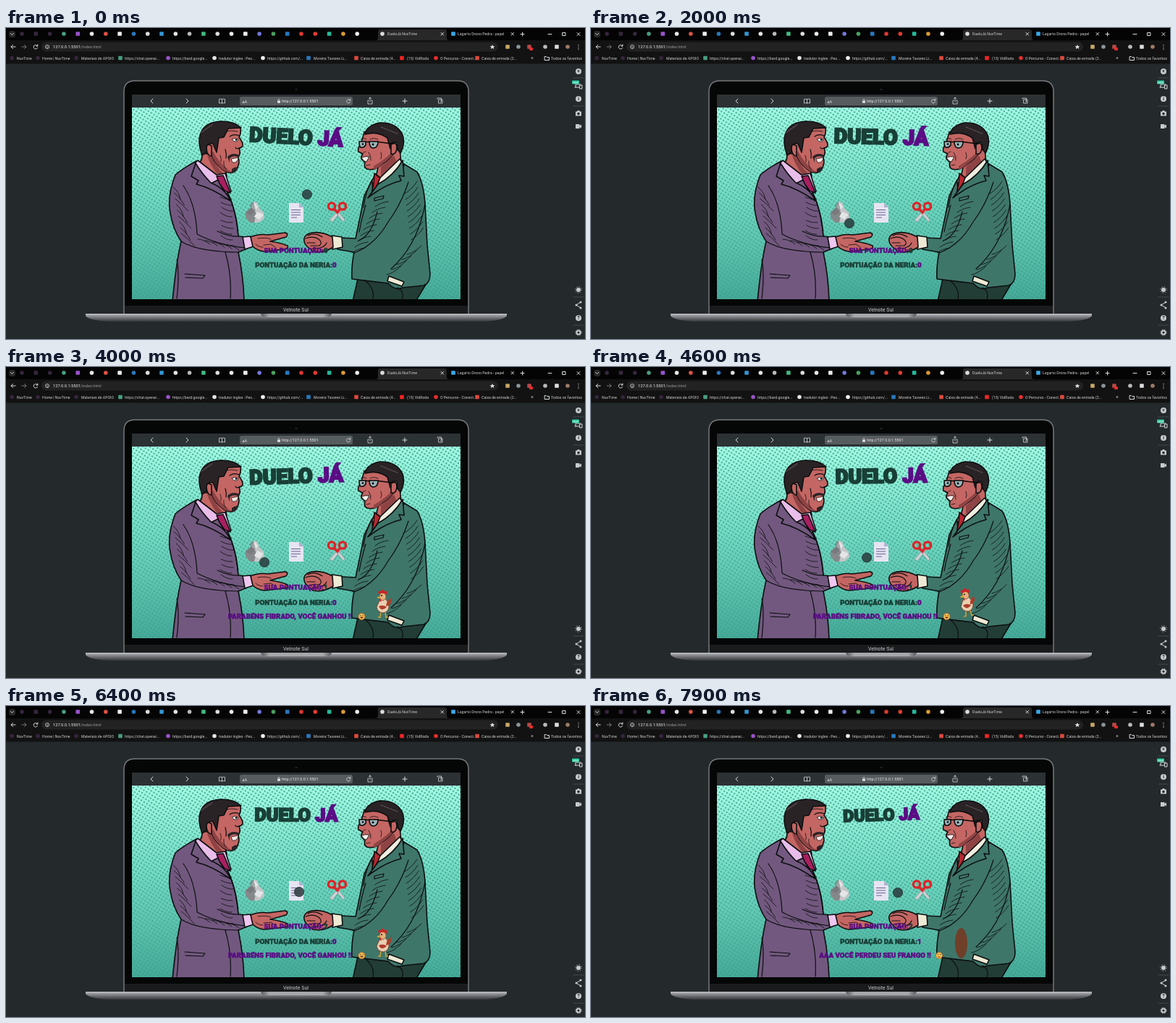
These frames come from a looping animation (800 by 430 pixels, 8 s). An HTML page:

```html
<!DOCTYPE html>
<html lang="pt">
<head>
<meta charset="utf-8">
<title>Duelo</title>
<style>
html, body { margin: 0; width: 100%; height: 100%; overflow: hidden; background: #24292c; }
svg { display: block; width: 800px; height: 430px; }
text { font-family: Roboto, "Open Sans", sans-serif; }
.small { font-size: 5.2px; fill: #cfcfcf; }
.game { font-family: Roboto, Inter, sans-serif; font-weight: 900; text-anchor: middle; }
.score { font-size: 9.7px; stroke-width: .5; }
.pu { fill: #5b0d85; stroke: #5b0d85; }
.gr { fill: #193f37; stroke: #193f37; }
.ink { stroke: #0c0f10; stroke-width: 1.6; stroke-linejoin: round; stroke-linecap: round; }
.line { fill: none; stroke: #0c0f10; stroke-width: 1.2; stroke-linecap: round; stroke-linejoin: round; }
.thin { stroke-width: .8; }
.icon { fill: none; stroke: #d8dcde; stroke-width: 1; stroke-linecap: round; stroke-linejoin: round; }
.skin { fill: #c46663; }
.shade { fill: #8f4344; }
.hair { fill: #2a2326; }
</style>
</head>
<body>
<svg viewBox="0 0 800 430">
<defs>
  <linearGradient id="mint" x2="0" y2="1">
    <stop stop-color="#a4fde6"/><stop offset=".45" stop-color="#73dcc5"/><stop offset="1" stop-color="#45aa98"/>
  </linearGradient>
  <linearGradient id="fade" x1=".6" x2=".4" y2="1">
    <stop stop-color="#bbb"/><stop offset=".45" stop-color="#999"/><stop offset="1" stop-color="#444"/>
  </linearGradient>
  <linearGradient id="metal" x2="0" y2="1">
    <stop stop-color="#c3c4c8"/><stop offset=".3" stop-color="#8e8f94"/><stop offset="1" stop-color="#333438"/>
  </linearGradient>
  <linearGradient id="notch" x2="1" y2="0">
    <stop stop-color="#55565a"/><stop offset=".12" stop-color="#a6a7ab"/><stop offset=".88" stop-color="#a6a7ab"/><stop offset="1" stop-color="#55565a"/>
  </linearGradient>
  <pattern id="dots" width="4.6" height="4.6" patternUnits="userSpaceOnUse" patternTransform="rotate(32)">
    <circle cx="2.3" cy="2.3" r="1.25" fill="#25806f"/>
  </pattern>
  <mask id="dotFade"><rect x="174" y="110" width="454" height="265" fill="url(#fade)"/></mask>
  <clipPath id="screen"><rect x="174" y="110" width="454" height="265"/></clipPath>
</defs>

<rect width="800" height="430" fill="#24292c"/>
<g id="chrome"></g>
<g id="side"></g>

<!-- laptop -->
<path d="M163 396V88q0-15 15-15H624q15 0 15 15V396Z" fill="#050606" stroke="#77797c" stroke-width="1.5"/>
<rect x="164" y="384" width="474" height="11" fill="#1a1b1d"/>
<circle cx="401" cy="85" r="1.6" fill="#1a2027"/>
<path d="M110 395H692V398Q688 404 660 406H142Q114 404 110 398Z" fill="url(#metal)"/>
<path d="M352 395H450Q449 400 443 400H359Q353 400 352 395Z" fill="url(#notch)"/>
<text x="400.500" y="391.500" font-size="7" fill="#c9cbcc" text-anchor="middle">Velnote Sul</text>

<!-- inner browser bar -->
<rect x="174" y="92" width="454" height="18.500" fill="#2c3134"/>
<rect x="323" y="95" width="156" height="12" rx="2.500" fill="#575c5f"/>
<g class="icon">
  <path d="M203 98l-3 3 3 3M249 98l3 3-3 3M548 101h6M551 98v6"/>
  <path d="M298.500 98.500q-2-1-4 0v5.500q2-1 4 0q2-1 4 0v-5.500q-2-1-4 0v5.500" stroke-width=".8"/>
  <path d="M501 100h-1v5h6v-5h-1M503 102v-6M501.500 97.500l1.500-1.500 1.500 1.500" stroke-width=".8"/>
  <path d="M596 98v-1h5.500v5h-1M598 99h5v5h-5z" stroke-width=".8"/>
  <path d="M475.500 100a2.600 2.600 0 1 0 .2 2M475.800 98v2h-2" stroke-width=".8"/>
</g>
<text x="326.500" y="103.500" font-size="5.500" fill="#eee">ᴀA</text>
<rect x="375" y="100.500" width="4" height="3.200" fill="#ddd"/><path d="M375.900 100.500v-1a1.100 1.100 0 0 1 2.200 0v1" fill="none" stroke="#ddd" stroke-width=".7"/>
<text x="381" y="103.200" font-size="5.400" fill="#eee">http://127.0.0.1:5501</text>

<g clip-path="url(#screen)">
  <rect x="174" y="110" width="454" height="265" fill="url(#mint)"/>
  <rect x="174" y="110" width="454" height="265" fill="url(#dots)" mask="url(#dotFade)"/>

  <!-- left man -->
  <g>
    <path class="ink" fill="#72587f" d="M263 184Q244 194 234 203Q224 228 226 249Q229 276 242 295Q235 325 230 378H329Q328 343 321 310L333 305L331 289L321 288Q319 254 306 227Q304 210 296 200Z"/>
    <path class="ink skin" d="M270 172Q273 184 265 187L296 209L305 205L300 180Z"/>
    <path class="shade" d="M278 176Q282 190 294 205L301 202Q288 190 286 178Z"/>
    <path class="ink skin" d="M272 162Q282 136 306 137L324 138Q325 146 322 151Q328 159 327 163Q325 166 322 166Q325 173 321 178L322 186Q320 197 313 200Q304 201 296 193Q286 184 284 174Z"/>
    <path class="shade" d="M286 170Q292 184 308 197L313 199Q304 201 296 193Q286 184 284 174Z"/>
    <path class="ink hair" d="M271 176Q264 158 269 145Q275 130 297 129Q316 129 325 138L307 139L301 151L294 152L291 172L286 160Q278 157 277 172Z"/>
    <path class="ink skin" d="M284 163Q277 158 277 167Q278 177 284 177Z"/>
    <path d="M306 178Q313 171 323 176L322 179Q314 175 309 180L309 186Z" fill="#2a2326"/>
    <path d="M312 195Q317 191 321 193Q318 201 312 200Z" fill="#2a2326"/>
    <path d="M311 181L321 179Q320 187 313 186Z" fill="#f6e6e5" stroke="#0c0f10" stroke-width=".7"/>
    <path d="M312 154Q316 151 321 154L319 157Q315 158 312 154Z" fill="#fff" stroke="#0c0f10" stroke-width=".8"/>
    <circle cx="318" cy="154.500" r="1.300"/>
    <path class="line" d="M309 150Q315 146 322 149M303 168Q305 174 304 180M322 166Q318 168 317 165"/>
    <path class="line thin" d="M304 143Q312 141 320 143M301 184Q300 191 304 195M296 176Q298 181 297 185"/>
    <path class="ink" fill="#e9bde9" d="M265 183L291 203L303 201L311 226L303 229L293 210L283 215Q268 201 261 187Z"/>
    <path class="ink" fill="#a91f60" d="M291 205L300 204L304 213L310 228L302 225L295 215Z"/>
    <path class="ink" fill="#72587f" d="M262 187L256 205L266 211L263 216Q284 221 310 239Q303 222 283 214Q271 202 262 187Z"/>
    <path class="line" d="M306 227Q317 249 321 288M245 218Q262 242 264 285Q292 300 331 304M242 295Q264 309 321 310M321 288Q309 289 292 281"/>
    <g id="folds" class="line thin"></g>
    <path class="line" d="M236 320Q240 340 236 374M303 310Q312 340 310 374M247 340L275 342L272 346L248 345"/>
    <path class="ink" fill="#eec6ef" d="M327 289L338 288L342 302L330 306Z"/>
    <path class="ink skin" d="M338 289Q349 284 362 286L386 283Q391 285 387 289L365 295Q380 297 389 301Q391 305 385 306L357 309Q347 308 341 302Z"/>
    <path class="line thin" d="M348 291Q359 289 366 292M356 300L366 299L372 303M345 299Q349 303 355 303"/>
  </g>

  <!-- right man -->
  <g>
    <path class="ink" fill="#223d36" d="M488 338L479 378H566L584 348Z"/>
    <path class="ink" fill="#3f766a" d="M545 185L568 199Q577 214 579 243L582 300L586 340Q586 353 577 356L548 359Q538 364 528 353L478 347Q477 330 481 310L458 306L462 290L483 291Q489 263 495 232L506 210Z"/>
    <path class="ink skin" d="M517 180L511 206L520 212L546 188L544 166Z"/>
    <path class="shade" d="M518 192L536 176L540 186L518 206Z"/>
    <path class="ink skin" d="M495 144Q516 134 536 150L538 170Q531 181 520 188Q510 198 499 195Q494 193 496 186L491 181Q490 178 493 174L487 171Q485 168 491 158Z"/>
    <path class="shade" d="M536 168Q528 179 508 191L508 196Q516 193 520 188Q531 181 538 170Z"/>
    <path class="ink hair" d="M496 147Q498 135 516 131Q540 130 548 148Q552 160 545 173L541 168L540 158L534 158L531 167L527 152Q513 142 496 147Z"/>
    <path class="ink skin" d="M532 161Q540 156 540 166Q539 176 532 174Z"/>
    <path d="M488 157H497V162Q494 166 490 165Q488 163 488 157ZM502 157H514Q514 166 507 166Q502 165 502 157Z" fill="#9cb4b8" stroke="#080808" stroke-width="1.500"/>
    <path d="M497 157.500H502M514 157.500L534 160" stroke="#080808" stroke-width="1.500"/>
    <circle cx="493" cy="160.500" r="1.300"/><circle cx="507" cy="161" r="1.400"/>
    <path d="M491 179Q497 177 502 178L498 185Q494 185 491 179Z" fill="#f8eeea" stroke="#0c0f10" stroke-width=".9"/>
    <path class="line thin" d="M501 172Q505 177 504 183M498 190L503 189M490 154Q494 151 498 154M503 154Q508 151 514 154M494 172L497 171M518 172Q520 177 518 181"/>
    <path class="ink" fill="#f0eee0" d="M544 181L550 190L518 218L507 229L506 211L510 202L517 207Z"/>
    <path class="ink" fill="#b92730" d="M509 201L517 207L514 215L505 230L508 214Z"/>
    <path class="ink" fill="#3f766a" d="M548 183L550 205L543 204L546 211Q522 217 500 235L514 216Q536 204 548 183Z"/>
    <path class="line" d="M505 211Q497 226 494 248M556 213Q546 244 528 268Q510 300 481 311M579 243Q569 300 532 333M509 235L522 232L521 236L509 239ZM497 245Q491 265 488 282M513 254Q505 287 487 294"/>
    <g id="creases" class="line thin"></g>
    <path class="ink" fill="#eee9d4" d="M529 343L550 351L547 357L527 350Z"/>
    <path class="line" d="M541 359Q551 365 547 375M496 349Q510 360 507 375"/>
    <path class="ink" fill="#eee9d4" d="M450 287L464 289L465 303L451 306Z"/>
    <path class="ink skin" d="M451 289Q437 281 423 283Q413 285 412 291Q411 297 416 302L424 309Q438 312 452 303Z"/>
    <path class="line" d="M414 291Q425 287 432 292Q438 297 433 301L421 301M417 287Q426 282 437 289M416 297L427 297M423 305L434 304Q441 302 443 297"/>
  </g>

  <!-- choices -->
  <g transform="translate(0 -2)">
    <path fill="#c4c6c8" d="M342 242L347 243L350 251L356 257L357 265L350 271H337L331 264L332 256L338 251Z"/>
    <path fill="#85888a" d="M331 257L339 250L346 258L343 271L337 271L331 264Z"/>
    <path fill="#e4e5e6" d="M343 243L348 249L345 254L339 250ZM347 256L356 260L350 267L343 263Z"/>
    <path fill="#6d7072" d="M342 242L337 246L338 251L331 257L338 261L345 254Z" opacity=".55"/>
    <path fill="#e7e4f2" d="M391 244H405L411 250V271H391Z"/>
    <path fill="#b4adcf" d="M405 244V250H411Z"/>
    <path stroke="#6c6494" stroke-width="1.100" d="M394 253.500H407M394 257H407M394 260.500H407M394 264H402"/>
    <path fill="#cfd2d5" stroke="#868b8f" stroke-width=".6" d="M453 254L456 252L468 267L466 270ZM461 252L464 254L451 270L447 268Z"/>
    <g fill="none" stroke="#db2528" stroke-width="3.400"><circle cx="450" cy="248.500" r="4.600"/><circle cx="465" cy="248.500" r="4.600"/><path d="M453 252L458 257L462 252"/></g>
  </g>

  <!-- scores -->
  <g id="scores" class="game score">
    <text x="400.500" y="310.500" class="pu">SUA PONTUAÇÃO:<tspan id="mine" class="gr">0</tspan></text>
    <text x="400.500" y="331" class="gr">PONTUAÇÃO DA NERIA:<tspan id="theirs" class="pu">0</tspan></text>
  </g>
  <text id="message" class="game score pu" x="392.500" y="348"></text>
  <g id="face">
    <circle r="4.600" fill="#f0bd52" stroke="#a85d27" stroke-width=".7"/>
    <path id="mouth" fill="#7c3520"/>
    <path d="M-2.200 -1.500h1M1.200 -1.500h1" stroke="#40251c" stroke-width="1.200"/>
  </g>
  <g id="rooster">
    <path d="M-3 10L-4 18H-7M3 10L4 18H7" fill="none" stroke="#d5a436" stroke-width="1.500"/>
    <path d="M-3 -8Q-7 -1 -9 4Q-7 12 1 12Q9 10 8 0Q6 -4 3 -8Z" fill="#e8ceb0" stroke="#6d3322" stroke-width=".8"/>
    <path d="M4 3Q14 1 10 -9Q7 -4 5 -2ZM-6 3Q-2 11 5 4Q0 0 -6 3Z" fill="#ae3c2a"/>
    <path d="M-5 -11Q-5 -16 0 -16Q5 -15 4 -8L0 -5L-4 -7Z" fill="#e6b07a" stroke="#6d3322" stroke-width=".7"/>
    <path d="M-6 -14Q-8 -20 -3 -18Q-1 -23 2 -18Q7 -20 5 -13Q0 -17 -6 -14Z" fill="#cc2627"/>
    <path d="M-5 -11L-9 -9L-4 -8Z" fill="#e8b733"/><path d="M-4 -8Q-6 -3 -2 -4Z" fill="#cc2627"/>
    <circle cx="-2" cy="-12" r=".9"/>
  </g>
  <ellipse id="loser" cx="511.500" cy="328" rx="8.500" ry="21" fill="#6f3f29"/>

  <g id="title">
    <text class="game" y="10.500" font-size="28.500" stroke-width="2.200"><tspan class="gr">DUELO</tspan><tspan class="pu"> JÁ</tspan></text>
  </g>
  <circle id="cursor" r="6.600" fill="#28383a" fill-opacity=".84" stroke="#1b292b" stroke-width=".7"/>
</g>
</svg>

<script>
const $ = id => document.getElementById(id);
const dot = (x, y, c, square) => square
  ? `<rect x="${x - 2.8}" y="${y - 2.8}" width="5.600" height="5.600" rx=".7" fill="${c}"/>`
  : `<circle cx="${x}" cy="${y}" r="2.800" fill="${c}"/>`;
const label = (x, y, s, extra = '') => `<text class="small" x="${x}" y="${y}" ${extra}>${s}</text>`;
const stroke = (d, extra = '') => `<path class="icon" d="${d}" ${extra}/>`;

function buildChrome() {
  const tabs = ['#35263c', '#35263c', '#35263c', '#479e83', '#9a52cc', '#e8e8e8', '#dd5145', '#eee', '#2878bd', '#ddd',
    '#3297d5', '#e6e6e6', '#bbb', '#42b883', '#ddd', '#eee', '#eee', '#7678dc', '#4aa05e',
    '#2878bd', '#dc3831', '#e33b31', '#25b99b', '#dd9a35', '#eee'];
  const marks = [
    [8, 'NuvTime', '#35263c', 15], [44, 'Home | NuvTime', '#35263c', 50], [97, 'Materiais de APOIO', '#35263c', 104],
    [158, 'https://chat.openai...', '#479e83', 164, 1], [224, 'https://bard.google...', '#9a52cc', 230],
    [288, 'tradutor ingles - Pes...', '#e5e5e5', 294], [355, 'https://github.com/...', '#eee', 361],
    [418, 'Moreira Tavares Li...', '#2878bd', 425, 1], [484, 'Caixa de entrada (4...', '#dc493d', 490, 1],
    [547, '(15) VidRoda', '#ed2525', 554, 1], [594, 'O Percurso - Conect...', '#e72e2e', 600],
    [651, 'Caixa de entrada (2...', '#dc493d', 657, 1]];
  let s = '<rect width="800" height="18" fill="#040404"/><rect y="17" width="800" height="32.500" fill="#121212"/>' +
    '<path d="M511 17q3 0 3-4V5q0-3 3-3h89q3 0 3 3v8q0 4 3 4z" fill="#282828"/>' +
    '<rect x="49" y="19.500" width="631" height="13" rx="6.500" fill="#222"/>' +
    '<rect x="4" y="4" width="9" height="9" rx="3" fill="#282828"/>' +
    stroke('M6.500 7.500l2 2 2-2');
  tabs.forEach((c, i) => s += dot(22 + i * 19.3, 8, c, i % 3 === 1));
  s += dot(520, 8, '#ddd') + label(527, 10, 'DueloJá NuvTime') + dot(618, 8, '#37a9e8', 1) +
    label(624, 10, 'Lagarto Drono Pedra - papel') +
    stroke('M601 6.500l3.500 3.500m0-3.500l-3.500 3.500M698 6.500l3.500 3.500m0-3.500l-3.500 3.500M711 8.500h5M713.500 6v5M749 8.500h5M769 6.500h4v4h-4zM789 6.500l4 4m0-4l-4 4') +
    stroke('M13 26H7m2.500-2.500L7 26l2.500 2.500', 'stroke-width=".9"') +
    stroke('M22 26h6m-2.500-2.500L28 26l-2.500 2.500', 'style="stroke:#777"') +
    stroke('M43.500 25a2.800 2.800 0 1 0 0 2.500M43.800 23v2h-2') +
    '<circle cx="57" cy="26" r="2.500" fill="none" stroke="#bbb"/><path d="M57 25v3" stroke="#bbb" stroke-width=".8"/>' +
    '<text x="65" y="28" font-size="5.700" fill="#eee">127.0.0.1:5501<tspan fill="#999">/index.html</tspan></text>' +
    '<path d="M672 23l1 2 2.400.2-1.800 1.600.6 2.200-2.200-1.200-2.200 1.200.6-2.200-1.800-1.600 2.400-.2z" fill="#ddd"/>';
  [[693, '#c8a765'], [708, '#8d969a'], [723, '#b74848'], [745, '#bbb'], [761, '#ddd'], [776, '#9d7b68']]
    .forEach(([x, c], i) => s += dot(x, 26, c, i % 2 === 0));
  s += '<rect x="723" y="27" width="5" height="4" rx="1" fill="#e62c2c"/><path d="M791 23v.8M791 25.800v.8M791 28.600v.8" stroke="#ddd" stroke-width="1.500"/>';
  for (const [x, name, color, tx, square] of marks) s += dot(x, 41.5, color, square) + label(tx, 43.5, name);
  s += label(725, 43.5, '»', 'style="font-size:8px"') + stroke('M744.500 39.500h2l1 1h3v4h-6z', 'stroke-width=".8"') + label(753, 43.5, 'Todos os favoritos');
  $('chrome').innerHTML = s;
}

function buildSide() {
  const disc = (y, mark) => `<circle cx="791" cy="${y}" r="4" fill="#c7cacb"/>` +
    `<text x="791" y="${y + 2.3}" font-size="6.500" font-weight="700" text-anchor="middle" fill="#24292c">${mark}</text>`;
  $('side').innerHTML = disc(60, '×') + disc(98, 'i') + disc(401, '?') +
    stroke('M786 82h6M787 82v-4h7M793 79h3v5h-3z') +
    '<rect x="782" y="72.500" width="10" height="5" rx="1" fill="#24c69b"/>' + label(787, 76.5, 'NEW', 'text-anchor="middle" style="font-size:3.500px;fill:#fff"') +
    stroke('M784 69h14M784 108h14M784 372h14M784 411h14', 'style="stroke:#42484c"') +
    '<path d="M787 115.500h2l1-1.500h2l1 1.500h2v6h-8z" fill="#c7cacb"/><circle cx="791" cy="118.500" r="1.700" fill="#24292c"/>' +
    '<path d="M787 133h5.500v2l2.500-1.500v5l-2.500-1.500v2H787z" fill="#c7cacb"/>' +
    '<circle cx="791" cy="362" r="3" fill="#c7cacb"/><circle cx="791" cy="362" r="4.300" fill="none" stroke="#c7cacb" stroke-dasharray="1.200 2.200"/>' +
    stroke('M794 379l-6 4 6 4') +
    [[788, 383], [794, 379], [794, 387]].map(([x, y]) => `<circle cx="${x}" cy="${y}" r="1.500" fill="#c7cacb"/>`).join('') +
    '<circle cx="791" cy="421" r="2.600" fill="none" stroke="#c7cacb" stroke-width="2"/><circle cx="791" cy="421" r="4" fill="none" stroke="#c7cacb" stroke-dasharray="1.600 1.600"/>';
}

function buildFolds() {
  let left = '', right = '';
  for (let i = 0; i < 9; i++) {
    const y = 220 + i * 8;
    left += `<path d="M${231 + i * 1.4} ${y}q8 6 ${10 + i % 3 * 4} 17"/><path d="M${312 + i % 3} ${y + 17}q-7 1-16 ${-3 - i % 4}"/>`;
    right += `<path d="M${568 + i * 1.1} ${y - 8}q-7 11-17 17"/><path d="M${528 - i * 4} ${y + 20}q-10 1-18 7"/>`;
  }
  for (let i = 0; i < 5; i++) {
    left += `<path d="M${265 + i * 10} ${292 + i * 2}q8 0 17 7"/>`;
    right += `<path d="M${574 - i * 7} ${301 + i * 7}q-10 10-20 12"/>`;
  }
  for (let i = 0; i < 6; i++) left += `<path d="M${268 + i * 3} ${146 - i * 2}l2-3" stroke="#77686c"/>`;
  for (let i = 0; i < 6; i++) right += `<path d="M${518 + i * 4} ${137 + i * 1.6}l3 1" stroke="#77686c"/>`;
  $('folds').innerHTML = left;
  $('creases').innerHTML = right;
}

const LOOP = 8000, WIN = 3200, WIN2 = 5800, LOSE = 7000;
const path = [[0, 416, 230], [900, 357, 270], [4300, 357, 270], [4900, 405, 257], [7200, 405, 257], [7700, 424, 258], [LOOP, 424, 258]];
const sizes = [[0, 1], [2500, 1.006], [4000, 1], [5300, .95], [6400, .885], [7900, .815], [LOOP, .811]];

function sample(steps, t) {
  const i = steps.findIndex((k, n) => n && t <= k[0]);
  const a = steps[i - 1], b = steps[i], u = (t - a[0]) / (b[0] - a[0]);
  return a.slice(1).map((v, n) => v + (b[n + 1] - v) * u);
}
const show = (id, on) => $(id).style.display = on ? '' : 'none';
const move = (id, value) => $(id).setAttribute('transform', value);

function draw(t) {
  const won = t >= WIN, lost = t >= LOSE;
  const [size] = sample(sizes, t);
  const [cx, cy] = sample(path, t);
  move('title', `translate(401 150) rotate(${3.1 * Math.cos(t / 1700 * 2 * Math.PI)}) scale(${size})`);
  move('cursor', `translate(${cx} ${cy})`);
  move('scores', `translate(0 ${won ? -2.5 : 0})`);
  $('mine').textContent = t >= WIN2 ? 2 : won ? 1 : 0;
  $('theirs').textContent = lost ? 1 : 0;
  $('message').textContent = !won ? '' : lost ? 'AAA VOCÊ PERDEU SEU FRANGO !!' : 'PARABÉNS FIBRADO, VOCÊ GANHOU !!';
  show('face', won);
  move('face', `translate(${lost ? 481 : 491.5} 345)`);
  $('mouth').setAttribute('d', lost ? 'M-2 2.500Q0 0 2 2.500Z' : 'M-2.500 .5H2.500Q0 5 -2.500 .5Z');
  show('rooster', won && !lost);
  const beat = t / 800 * 2 * Math.PI;
  move('rooster', `translate(${521 + 1.5 * Math.sin(beat)} ${327 + Math.cos(beat * 2)}) rotate(${8 * Math.sin(beat)})`);
  show('loser', lost);
}

buildChrome();
buildSide();
buildFolds();
const start = performance.now();
function tick() {
  draw((performance.now() - start) % LOOP);
  requestAnimationFrame(tick);
}
tick();
</script>
</body>
</html>
```
